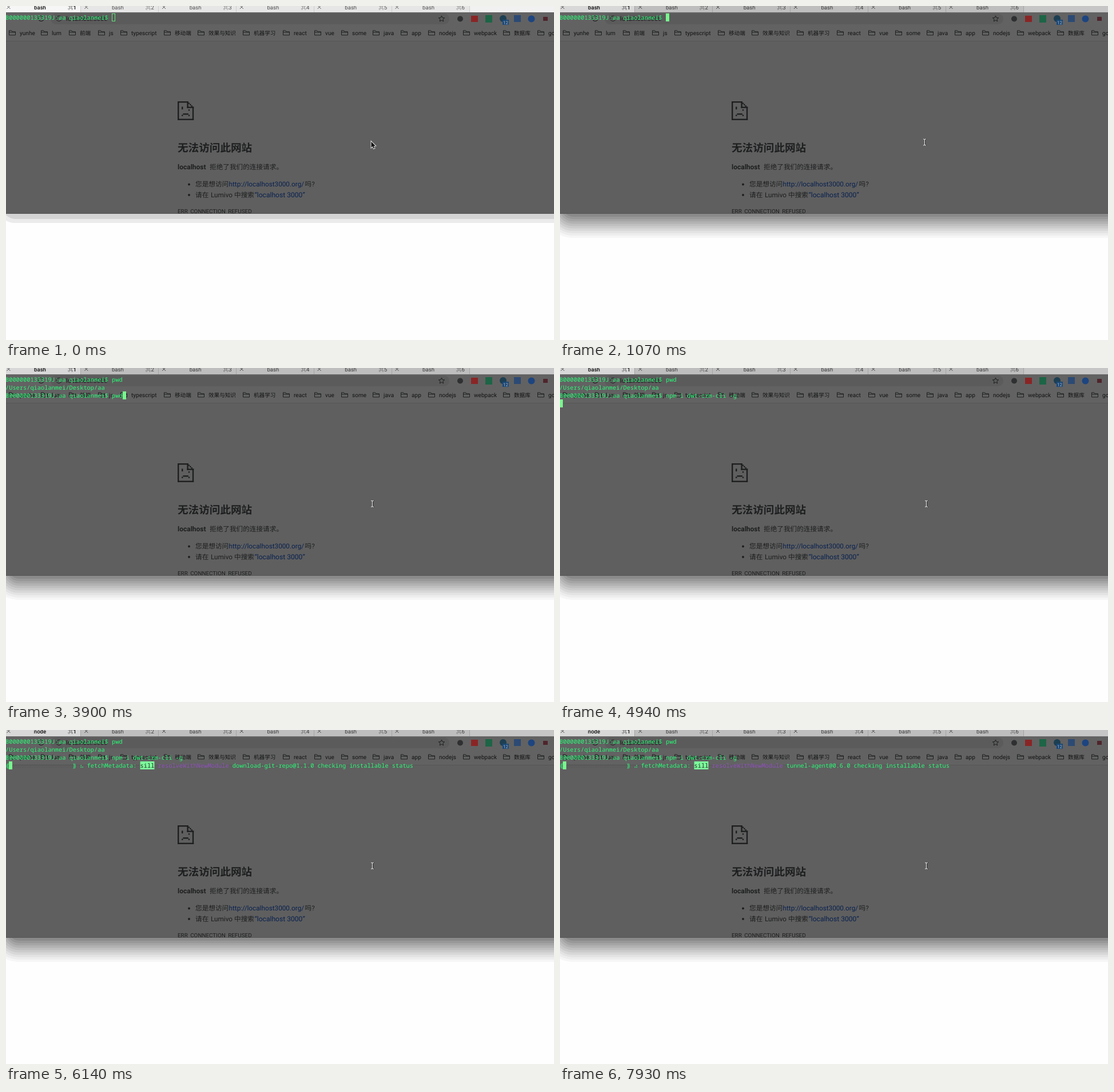
Write an HTML page with a canvas that moves like this. It is 958 px wide and 585 px high and loops after 8000 ms.

```html
<!DOCTYPE html>
<html lang="zh-CN">
<head>
<meta charset="utf-8">
<title>Terminal install</title>
<style>
html, body { margin: 0; width: 100%; height: 100%; overflow: hidden; background: #fff; }
canvas { display: block; }
</style>
</head>
<body>
<canvas id="stage" width="958" height="585"></canvas>
<script>
const ctx = document.getElementById('stage').getContext('2d');
const LOOP = 8000;
const UI = 'Roboto, "Noto Sans CJK SC", "Noto Sans CJK", sans-serif';
const MONO = '"Noto Sans Mono", "DejaVu Sans Mono", monospace';
const CELL = 6.2, ROW = 14, LEFT = -1, TOP = 13;
const GREEN = '#2bfb78', BLOCK = '#78f78e', INK = '#1d1e1f', LINK = '#08214f';
const PROMPT = 'B000000133319J:aa qiaolanmei$ ';

function box(x, y, w, h, color) {
  ctx.fillStyle = color;
  ctx.fillRect(x, y, w, h);
}

function disc(x, y, r, color) {
  ctx.fillStyle = color;
  ctx.beginPath();
  ctx.arc(x, y, r, 0, Math.PI * 2);
  ctx.fill();
}

function label(str, x, y, size, color, weight = 400, align = 'left') {
  ctx.font = `${weight} ${size}px ${UI}`;
  ctx.textAlign = align;
  ctx.fillStyle = color;
  ctx.fillText(str, x, y);
}

function poly(points, fill, stroke, width = 1) {
  ctx.beginPath();
  points.forEach(([x, y], i) => i ? ctx.lineTo(x, y) : ctx.moveTo(x, y));
  ctx.closePath();
  if (stroke) {
    ctx.strokeStyle = stroke;
    ctx.lineWidth = width;
    ctx.stroke();
  }
  if (fill) {
    ctx.fillStyle = fill;
    ctx.fill();
  }
}

// ---- window shadow and tabs ----

function band(left, bottom, r, gray) {
  ctx.fillStyle = `rgb(${gray},${gray},${gray})`;
  ctx.beginPath();
  ctx.roundRect(left, 200, 1100, bottom - 200, r);
  ctx.fill();
}

function shadow(active) {
  if (active) {
    for (let i = 0; i < 10; i++) {
      band(-20 + i * 2.6, 406 - i * 4.1, 40 - i * 2.2, Math.round(246 - 108 * (i / 9) ** 1.15));
    }
  } else {
    band(-10, 380, 24, 235);
    band(-6, 373, 22, 212);
  }
}

function tabs(active, title) {
  const bar = active ? '#bebebe' : '#e6e6e6';
  const ink = active ? '#3c3c3c' : '#505050';
  box(0, 0, 958, 11, bar);
  box(0, 0, 130, 11, active ? '#d8d8d8' : '#f6f6f6');
  box(810, 0, 148, 11, active ? '#c6c6c6' : '#f1f1f1');
  for (let i = 0; i < 6; i++) {
    const x = i * 135.8, color = i ? ink : '#111';
    ctx.strokeStyle = ink;
    ctx.lineWidth = 0.9;
    ctx.beginPath();
    ctx.moveTo(x + 1.5, -1); ctx.lineTo(x + 7.5, 5);
    ctx.moveTo(x + 7.5, -1); ctx.lineTo(x + 1.5, 5);
    ctx.stroke();
    label(i ? 'bash' : title, x + 59.5, 5.5, 9.6, color, i ? 400 : 500, 'center');
    label('⌘' + (i + 1), x + 123, 5.5, 9.6, color, i ? 400 : 500, 'right');
    box(Math.round(i * 136 + 130), 0, 1, 11, active ? '#a4a4a4' : '#cfcfcf');
  }
  box(0, 11, 958, 1, '#6c6c6c');
}

// ---- dimmed browser page ----

function folder(x, y) {
  ctx.strokeStyle = INK;
  ctx.lineWidth = 1;
  ctx.beginPath();
  ctx.moveTo(x + 0.5, y + 8.5);
  ctx.lineTo(x + 0.5, y + 0.5);
  ctx.lineTo(x + 4.5, y + 0.5);
  ctx.lineTo(x + 6, y + 2.5);
  ctx.lineTo(x + 11.5, y + 2.5);
  ctx.lineTo(x + 11.5, y + 8.5);
  ctx.closePath();
  ctx.moveTo(x + 0.5, y + 3.5);
  ctx.lineTo(x + 11.5, y + 3.5);
  ctx.stroke();
}

function star(cx, cy, r) {
  const pts = Array.from({ length: 10 }, (_, i) => {
    const a = i * Math.PI / 5 - Math.PI / 2, d = i % 2 ? r * 0.45 : r;
    return [cx + d * Math.cos(a), cy + d * Math.sin(a)];
  });
  poly(pts, null, INK, 1);
}

function toolbar() {
  box(0, 12, 958, 49, '#626262');
  box(0, 61, 958, 1, '#575757');
  ctx.fillStyle = '#5b5b5b';
  ctx.beginPath();
  ctx.roundRect(78, 13, 697, 19, 9.5);
  ctx.fill();
  ctx.strokeStyle = INK;
  ctx.lineWidth = 1.1;
  ctx.beginPath();
  ctx.arc(61.5, 22, 4.5, 0.4, 5.6);
  ctx.moveTo(97, 22);
  ctx.arc(92.5, 22, 4.5, 0, Math.PI * 2);
  ctx.stroke();
  label('localhost:3000', 105, 26, 11, INK);

  star(761.5, 22.5, 5.5);
  disc(794, 22.5, 5, '#2f3031');
  box(813, 17, 12, 11, '#8a2526');
  box(838, 16, 12, 13, '#1d6546');
  disc(869, 22, 6, '#1d3f52');
  box(868, 24, 11, 9, '#1a4878');
  label('12', 873.5, 31.5, 8, '#a9b2bc', 400, 'center');
  box(888, 16, 12, 12, '#2c4a74');
  disc(918.5, 22.5, 6, '#1d4580');
  box(939, 19, 8, 7, '#4f252b');

  const marks = [['yunhe', 24], ['lum', 80], ['前端', 129], ['js', 180], ['typescript', 219],
    ['移动端', 295], ['效果与知识', 354], ['机器学习', 433], ['react', 503], ['vue', 558],
    ['some', 605], ['java', 660], ['app', 709], ['nodejs', 757], ['webpack', 818],
    ['数据库', 888], ['go', 948]];
  for (const [name, x] of marks) {
    folder(x - 19, 42.5);
    label(name, x, 50.5, /[a-z]/.test(name) ? 10.1 : 9.6, '#131415');
  }
}

function sadPage(x, y) {
  const u = 2.35;
  const px = (c, r, w, h) => box(x + c * u, y + r * u, w * u, h * u, INK);
  px(0, 0, 8, 1);
  px(0, 0, 1, 14);
  px(0, 13, 12, 1);
  px(11, 4, 1, 10);
  px(7, 0, 1, 5);
  px(7, 4, 5, 1);
  px(8, 1, 1, 1);
  px(9, 2, 1, 1);
  px(10, 3, 1, 1);
  px(3, 4, 1, 2);
  px(8, 6, 1, 1);
  px(4, 9, 4, 1);
  px(3, 10, 1, 1);
  px(8, 10, 1, 1);
}

function page() {
  box(0, 11, 958, 353, '#5f5f5f');
  toolbar();
  sadPage(300, 167);
  label('无法访问此网站', 300, 254.5, 18.6, INK, 700);
  label('localhost', 300, 286, 12, INK, 700);
  label('拒绝了我们的连接请求。', 356, 286, 11.65, INK);
  disc(320, 312.5, 1.9, INK);
  label('您是想访问', 331, 316, 11.65, INK);
  label('http://localhost3000.org/', 389.5, 316, 11.75, LINK);
  label('吗?', 522.5, 316, 11.65, INK);
  disc(320, 331, 1.9, INK);
  label('请在', 331, 334.5, 11.65, INK);
  label('Lumivo', 358, 334.5, 11.75, INK);
  label('中搜索', 399, 334.5, 11.65, INK);
  label('“localhost 3000”', 434.5, 334.5, 12.1, LINK);
  label('ERR_CONNECTION_REFUSED', 300, 363, 9.87, INK);
  box(0, 363, 958, 1, '#565656');
}

// ---- terminal ----

const colX = c => LEFT + c * CELL;
const rowY = r => TOP + r * ROW;

// Writes on the character grid and returns the next column
function put(str, col, row, color = GREEN) {
  ctx.font = `400 10.33px ${MONO}`;
  ctx.textAlign = 'left';
  ctx.fillStyle = color;
  for (const ch of str) ctx.fillText(ch, colX(col++), rowY(row) + 11);
  return col;
}

function block(col, row, hollow) {
  const x = Math.round(colX(col)), y = rowY(row);
  if (!hollow) return box(x, y, 6, ROW, BLOCK);
  ctx.strokeStyle = '#63e37c';
  ctx.lineWidth = 1;
  ctx.strokeRect(x + 0.5, y + 0.5, 5, ROW - 1);
}

function spinner(ch) {
  const bits = ch.charCodeAt(0) - 0x2800;
  for (let i = 0; i < 6; i++) {
    if (bits >> i & 1) box(i < 3 ? 130.5 : 133.3, 58.5 + (i % 3) * 2.9, 1.5, 1.5, GREEN);
  }
}

function progress({ spin, step, level, task, rest }) {
  for (const dx of [0, 0.3]) {
    put('(', dx, 3);
    put(')', 18.8 + dx, 3);
  }
  for (let x = 7; x < 116; x += 3) {
    for (let k = 0; k < 3; k++) box(x + k % 2 * 1.5, 60 + k * 2.5, 1, 1, '#4f5250');
  }
  spinner(spin);
  let c = put(step, 23, 3) + 1;
  const verb = level === 'verb';
  box(colX(c), rowY(3), 4 * CELL, ROW, verb ? '#7d8889' : '#7dfb9c');
  c = put(level, c, 3, verb ? '#3cc4ea' : '#1d2b22') + 1;
  c = put(task, c, 3, '#9152bd') + 1;
  put(rest, c, 3);
}

const fetching = (spin, pkg) => ({
  spin, step: 'fetchMetadata:', level: 'sill', task: 'resolveWithNewModule',
  rest: pkg + ' checking installable status'
});

function progressAt(t) {
  if (t < 5990) return {
    spin: t < 5840 ? '⠧' : '⠏', step: 'rollbackFailedOptional:', level: 'verb',
    task: 'npm-session', rest: '699a282f99430735'
  };
  if (t < 6140) return {
    spin: '⠋', step: 'loadIdealTree:loadAllDepsIntoIdealTree:', level: 'sill',
    task: 'install', rest: 'loadIdealTree'
  };
  if (t < 7040) return fetching('⠦', 'download-git-repo@1.1.0');
  if (t < 7780) return fetching(t < 7330 ? '⠹' : '⠼', 'request@2.88.0');
  if (t < 7930) return fetching('⠙', 'oauth-sign@0.9.0');
  return fetching('⠴', 'tunnel-agent@0.6.0');
}

function terminal(t) {
  const typed = [2410, 2560, 2700].filter(at => t >= at).length;
  let end = put(PROMPT + 'pwd'.slice(0, typed), 0, 0);
  if (t < 3000) return block(end, 0, t < 1070);

  put('/Users/qiaolanmei/Desktop/aa', 0, 1);
  const command = t < 3900 ? '' : t < 4190 ? 'pwd' : 'npm i dwt-crm-cli -g';
  end = put(PROMPT + command, 0, 2);
  if (t < 4940) return block(end, 2);
  if (t < 5540) return block(0, 3);

  progress(progressAt(t));
  if (t >= 6140) block(1, 3);
}

// ---- pointer ----

function arrow(x, y) {
  const shape = [[0, 0], [0, 10.5], [2.4, 8.3], [4.2, 12.3], [5.9, 11.5], [4.2, 7.7], [7.4, 7.4]];
  poly(shape.map(([a, b]) => [x + a, y + b]), '#111', '#eee', 1.8);
}

function beam(x, y) {
  for (const [color, dx] of [['#222', 1], ['#e8e8e8', 0]]) {
    const cx = x + dx;
    ctx.strokeStyle = color;
    ctx.lineWidth = 1.1;
    ctx.beginPath();
    for (const side of [-2.4, 2.4]) {
      ctx.moveTo(cx + side, y - 5.5);
      ctx.quadraticCurveTo(cx, y - 5.5, cx, y - 4);
      ctx.lineTo(cx, y + 4);
      ctx.quadraticCurveTo(cx, y + 5.5, cx + side, y + 5.5);
    }
    ctx.stroke();
  }
}

function pointer(t) {
  if (t < 890) arrow(638.5, 237.5);
  else if (t < 1520) beam(637.5, 238.5);
  else beam(640.5, t < 1670 ? 238.5 : 237.8);
}

function draw(now) {
  const t = now % LOOP, active = t >= 1070;
  ctx.textRendering = 'geometricPrecision';
  box(0, 0, 958, 585, '#fefefe');
  shadow(active);
  page();
  tabs(active, t < 5990 ? 'bash' : 'node');
  terminal(t);
  pointer(t);
}

let start;
function tick(now) {
  start ??= now;
  draw(now - start);
  requestAnimationFrame(tick);
}
draw(0);
requestAnimationFrame(tick);
</script>
</body>
</html>
```
